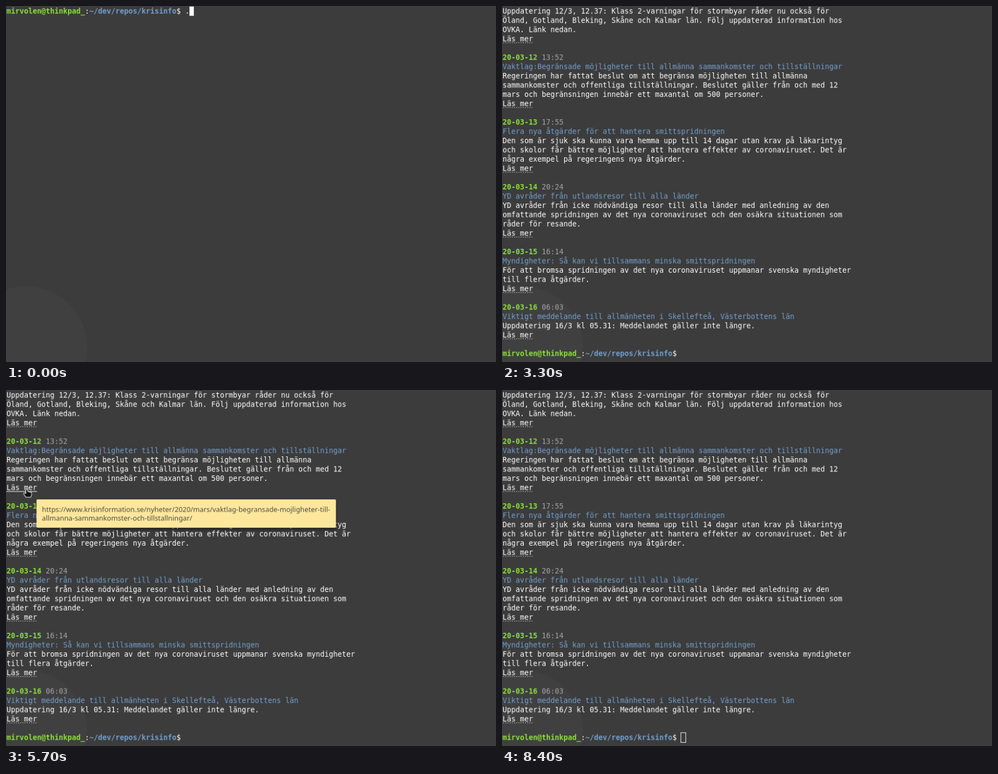
An HTML page with a canvas for the animation above (8500 ms loop, 877 by 638 pixels).

```html
<!DOCTYPE html>
<html lang="sv">
<head>
<meta charset="utf-8">
<title>krisinfo</title>
<style>
html, body { margin: 0; height: 100%; overflow: hidden; background: #3c3c3c; }
canvas { display: block; }
</style>
</head>
<body>
<canvas id="stage" width="877" height="638"></canvas>
<script>
const stage = document.getElementById('stage').getContext('2d');
stage.imageSmoothingQuality = 'high';

// The terminal has whole-pixel cells and is shown slightly reduced on the stage
const screen = document.createElement('canvas');
screen.width = 900;
screen.height = 654;
const ctx = screen.getContext('2d');

const LOOP = 8500, CELL_W = 8, CELL_H = 17, ASCENT = 13;
const MONO = '13.333px "DejaVu Sans Mono", monospace';
const BACK = '#3c3c3c', GREEN = '#8ae234', BLUE = '#729fcf', GRAY = '#a4a4a4', WHITE = '#fff';
const PROMPT_COL = 41, PROMPT_ROW = 37, HOVER_ROW = 10;
const BLINKS = [2800, 3300, 3800, 4400, 5000, 5700, 6300, 6900, 7500, 8100];
const HAND = new Path2D('M4 9V1.5Q5.2 0 6.5 1.5V5L12 6Q13.5 6.5 13.5 8V11L12 14.5H4L0.5 10V7.5Q2 7 4 9Z');

// '@' marks a date line, '#' a heading, '>' a link
const OUTPUT = `Uppdatering 12/3, 12.37: Klass 2-varningar för stormbyar råder nu också för
Öland, Gotland, Bleking, Skåne och Kalmar län. Följ uppdaterad information hos
OVKA. Länk nedan.
>Läs mer

@20-03-12 13:52
#Vaktlag:Begränsade möjligheter till allmänna sammankomster och tillställningar
Regeringen har fattat beslut om att begränsa möjligheten till allmänna
sammankomster och offentliga tillställningar. Beslutet gäller från och med 12
mars och begränsningen innebär ett maxantal om 500 personer.
>Läs mer

@20-03-13 17:55
#Flera nya åtgärder för att hantera smittspridningen
Den som är sjuk ska kunna vara hemma upp till 14 dagar utan krav på läkarintyg
och skolor får bättre möjligheter att hantera effekter av coronaviruset. Det är
några exempel på regeringens nya åtgärder.
>Läs mer

@20-03-14 20:24
#YD avråder från utlandsresor till alla länder
YD avråder från icke nödvändiga resor till alla länder med anledning av den
omfattande spridningen av det nya coronaviruset och den osäkra situationen som
råder för resande.
>Läs mer

@20-03-15 16:14
#Myndigheter: Så kan vi tillsammans minska smittspridningen
För att bromsa spridningen av det nya coronaviruset uppmanar svenska myndigheter
till flera åtgärder.
>Läs mer

@20-03-16 06:03
#Viktigt meddelande till allmänheten i Skellefteå, Västerbottens län
Uppdatering 16/3 kl 05.31: Meddelandet gäller inte längre.
>Läs mer`.split('\n');

const cellX = col => 1 + col * CELL_W;
const cellY = row => 1 + row * CELL_H;

function write(text, col, row, color = WHITE, bold = false) {
  ctx.font = (bold ? 'bold ' : '') + MONO;
  ctx.fillStyle = color;
  [...text].forEach((char, i) => ctx.fillText(char, cellX(col + i), cellY(row) + ASCENT));
}

function prompt(row, command = '') {
  write('mirvolen@thinkpad_', 0, row, GREEN, true);
  write(':', 18, row);
  write('~/dev/repos/krisinfo', 19, row, BLUE, true);
  write('$ ' + command, 39, row);
}

function cursor(col, row, hollow = false) {
  const x = cellX(col), y = cellY(row);
  if (hollow) {
    ctx.strokeStyle = WHITE;
    ctx.lineWidth = 1;
    ctx.strokeRect(x - 0.5, y - 0.5, CELL_W + 1, CELL_H + 1);
  } else {
    ctx.fillStyle = WHITE;
    ctx.fillRect(x, y, CELL_W, CELL_H);
  }
}

function link(text, row, hovered) {
  write(text, 0, row);
  const y = cellY(row) + 15;
  if (hovered) ctx.fillRect(1, y, text.length * CELL_W, 1);
  else for (let i = 1 / 6; i < text.length; i += 0.5) ctx.fillRect(cellX(i), y, CELL_W / 6, 1);
}

function output(hovered) {
  OUTPUT.forEach((line, row) => {
    const text = line.slice(1);
    if (line[0] === '@') {
      write(text.slice(0, 8), 0, row, GREEN, true);
      write(text.slice(9), 9, row, GRAY);
    } else if (line[0] === '#') write(text, 0, row, BLUE);
    else if (line[0] === '>') link(text, row, hovered && row === HOVER_ROW);
    else write(line, 0, row);
  });
}

function hand(x, y) {
  ctx.save();
  ctx.translate(x, y);
  ctx.fillStyle = '#111';
  ctx.strokeStyle = WHITE;
  ctx.lineWidth = 2;
  ctx.stroke(HAND);
  ctx.fill(HAND);
  ctx.restore();
}

function tooltip() {
  ctx.save();
  ctx.shadowColor = 'rgba(0,0,0,.4)';
  ctx.shadowBlur = 5;
  ctx.shadowOffsetY = 4;
  ctx.fillStyle = '#fce79c';
  ctx.beginPath();
  ctx.roundRect(56, 201, 550, 52, 2);
  ctx.fill();
  ctx.restore();
  ctx.font = '12.83px "Noto Sans", sans-serif';
  ctx.fillStyle = '#4b4a42';
  ctx.fillText('https://www.krisinformation.se/nyheter/2020/mars/vaktlag-begransade-mojligheter-till-', 66, 224);
  ctx.fillText('allmanna-sammankomster-och-tillstallningar/', 66, 240);
}

function typing(t) {
  const command = t < 400 ? '.' : t < 800 ? './' : t < 900 ? './k' : './krisinfo.py ';
  prompt(0, command);
  if (t < 1400) cursor(PROMPT_COL + command.length, 0);
  else cursor(0, 1);
}

function results(t) {
  output(t >= 4300 && t < 7200);
  prompt(PROMPT_ROW);
  const lit = BLINKS.filter(time => time <= t).length % 2;
  if (lit || t >= 8400) cursor(PROMPT_COL, PROMPT_ROW, t >= 8400);
  if (t >= 5000 && t < 7200) tooltip();
  if (t >= 4100 && t < 7200) {
    const left = Math.max(0, 3 - Math.floor((t - 4100) / 100)) / 3;
    hand(33 + 50 * left ** 2, 182 + 75 * left ** 2);
  }
}

function draw(now) {
  const t = now % LOOP;
  ctx.fillStyle = BACK;
  ctx.fillRect(0, 0, screen.width, screen.height);
  ctx.fillStyle = '#404040';
  ctx.beginPath();
  ctx.arc(37, 627, 112, 0, 2 * Math.PI);
  ctx.fill();
  if (t < 1900) typing(t);
  else results(t);
  stage.drawImage(screen, 0, 0, 877, 638);
  requestAnimationFrame(draw);
}
requestAnimationFrame(draw);
</script>
</body>
</html>
```
